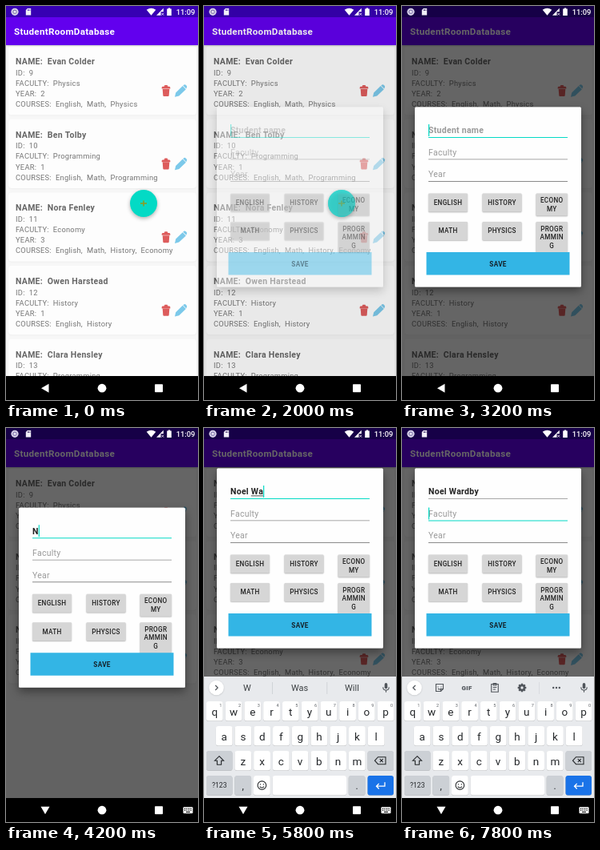
These frames come from a looping animation (240 px wide and 493 px high, 8000 ms). An HTML page with a canvas:

```html
<!DOCTYPE html>
<html lang="en">
<head>
<meta charset="utf-8">
<title>StudentRoomDatabase</title>
<style>
html, body { margin: 0; height: 100%; overflow: hidden; background: #000; }
canvas { display: block; width: 100vw; height: 100vh; }
</style>
</head>
<body>
<canvas id="stage"></canvas>
<script>
const W = 240, H = 493, LOOP = 8000, STEP = 200;
const NAV_TOP = 463, TEAL = '#03dac5';
const canvas = document.getElementById('stage');
const ctx = canvas.getContext('2d');
const ratio = window.devicePixelRatio || 1;
canvas.width = W * ratio;
canvas.height = H * ratio;

const students = [
  ['Evan Colder', 9, 'Physics', 2, 'English,  Math,  Physics'],
  ['Ben Tolby', 10, 'Programming', 1, 'English,  Math,  Programming'],
  ['Nora Fenley', 11, 'Economy', 3, 'English,  Math,  History,  Economy'],
  ['Owen Harstead', 12, 'History', 1, 'English,  History'],
  ['Clara Hensley', 13, 'Programming', 2, 'English,  Math']
];
const typedName = 'Noel Wardby';
const keyTimes = [4200, 4600, 4600, 4800, 5200, 5600, 5800, 6000, 6200, 6600, 6800];
const suggestions = [
  [0, ['N', 'No', 'Not']],
  [4800, ['Noe', 'Noel', 'Noels']],
  [5600, ['W', 'Was', 'Will']],
  [6000, ['War', 'Ward', 'Warm']]
];

const clamp = v => Math.max(0, Math.min(1, v));
const smooth = v => { v = clamp(v); return v * v * (3 - 2 * v); };

function rect(x, y, w, h, color, radius = 0) {
  ctx.fillStyle = color;
  ctx.beginPath();
  ctx.roundRect(x, y, w, h, radius);
  ctx.fill();
}

function circle(x, y, r, color) {
  rect(x - r, y - r, 2 * r, 2 * r, color, r);
}

// y is the middle of the capital letters
function text(s, x, y, size, color, { weight = 400, align = 'left', spacing = 0 } = {}) {
  ctx.font = `${weight} ${size}px Roboto, sans-serif`;
  ctx.letterSpacing = spacing + 'px';
  ctx.textAlign = align;
  ctx.fillStyle = color;
  ctx.fillText(s, x, y + size * 0.36);
  return ctx.measureText(s).width;
}

function icon(path, x, y, color, line = 0) {
  ctx.save();
  ctx.translate(x, y);
  const shape = new Path2D(path);
  if (line) {
    ctx.strokeStyle = color;
    ctx.lineWidth = line;
    ctx.stroke(shape);
  } else {
    ctx.fillStyle = color;
    ctx.fill(shape, 'evenodd');
  }
  ctx.restore();
}

function shadowed(blur, offset, alpha, draw) {
  ctx.save();
  ctx.shadowColor = `rgba(0,0,0,${alpha})`;
  ctx.shadowBlur = blur * ratio;
  ctx.shadowOffsetY = offset * ratio;
  draw();
  ctx.restore();
}

function drawCard([name, id, faculty, year, courses], top) {
  shadowed(2, 0.5, 0.06, () => rect(3, top, 235, 86.5, '#fdfdfd', 4));
  text('NAME:  ' + name, 12, top + 19.4, 10.5, '#666', { weight: 700, spacing: 0.28 });
  ['ID:  ' + id, 'FACULTY:  ' + faculty, 'YEAR:  ' + year, 'COURSES:  ' + courses]
    .forEach((s, i) => text(s, 12, top + 33.4 + i * 13.1, 9.33, '#757575', { spacing: 0.24 }));
  icon('M-4.3-2H4.3L3.7 6Q3.6 7 2.6 7H-2.6Q-3.6 7-3.7 6ZM-5.3-2.4V-4Q-5.2-5-4.2-5.2H-2.4L-1.6-7H1.6L2.4-5.2H4.2Q5.2-5 5.3-4V-2.4Z',
    200, top + 56, '#dd5c5c');
  icon('M-7.5 7.7L-6.3 2.4L2.3-6L6.4-1.8L-2.2 6.4ZM2.8-6.5L4.1-7.6Q5.2-8.2 6.2-7.2L7.4-5.9Q8.1-4.8 7.3-3.8L6.8-2.4Z',
    218.5, top + 56, '#7cc9ea');
}

function drawFab(ripple) {
  shadowed(5, 2, 0.3, () => circle(172, 247, 17, TEAL));
  if (ripple > 0) circle(172, 247, 17 * ripple, 'rgba(30,195,220,.3)');
  icon('M-4 0H4M0-3.5V3.5', 172, 247, '#8c9b22', 1.6);
}

function drawApp(t, resized) {
  rect(0, 0, W, NAV_TOP, '#f7f7f7');
  students.slice(0, resized ? 3 : 5).forEach((s, i) => drawCard(s, 50 + i * 91.6));
  drawFab(t < 2400 ? clamp((t - 1600) / 400) : 0);
  shadowed(2, 0.7, 0.2, () => rect(0, 14, W, 35, '#6200ee'));
  rect(0, 0, W, 14, '#3700b3');
  text('StudentRoomDatabase', 10, 32, 11.67, '#fff', { weight: 700, spacing: 0.28 });
}

function drawButton(lines, x, y, w, h) {
  shadowed(1.5, 0.7, 0.3, () => rect(x, y, w, h, '#d6d6d6', 1.2));
  const first = y + h / 2 - (lines.length - 1) * 5.2;
  lines.forEach((s, i) =>
    text(s, x + w / 2, first + i * 10.4, 8.17, '#212121', { weight: 500, align: 'center', spacing: 0.33 }));
}

function drawField(label, value, y, focused, cursorOn, bold, composing) {
  const style = { weight: bold ? 700 : 400, spacing: 0.28 };
  const width = text(value || label, 33, y, 10.5, value ? '#212121' : '#9a9a9a', style);
  rect(33, y + 8.4, 174, focused ? 1.2 : 0.8, focused ? TEAL : '#8a8a8a');
  if (!focused) return;
  const wordStart = value.lastIndexOf(' ') + 1;
  if (composing && wordStart < value.length) {
    const before = ctx.measureText(value.slice(0, wordStart)).width;
    rect(33 + before, y + 5, width - before, 0.8, '#212121');
  }
  if (cursorOn) rect(33 + (value ? width : 0), y - 7.5, 1.2, 15, TEAL);
}

function drawDialogPanel() {
  // Keep the shadow outside, so that the panel can fade evenly
  ctx.save();
  ctx.beginPath();
  ctx.rect(-W, -H, 3 * W, 3 * H);
  ctx.rect(16, 126.5, 208, 225);
  ctx.clip('evenodd');
  shadowed(12, 5, 0.4, () => rect(16, 126.5, 208, 225, '#fefefe', 1.5));
  ctx.restore();
  rect(16, 126.5, 208, 225, '#fefefe', 1.5);
}

function drawDialog(t) {
  const value = typedName.slice(0, keyTimes.filter(k => k <= t).length);
  const onFaculty = t >= 7000;
  const cursorOn = t < 2400 || t >= 3000;
  drawDialogPanel();
  drawField('Student name', value, 155.5, !onFaculty, cursorOn, true, t >= 4400);
  drawField('Faculty', '', 183, onFaculty, cursorOn);
  drawField('Year', '', 210.7, false);
  drawButton(['ENGLISH'], 33, 234.5, 49, 23);
  drawButton(['HISTORY'], 100.5, 234.5, 49, 23);
  drawButton(['ECONO', 'MY'], 167.5, 234.5, 39.5, 28);
  drawButton(['MATH'], 33, 270, 49, 23);
  drawButton(['PHYSICS'], 100.5, 270, 49, 23);
  drawButton(['PROGR', 'AMMIN', 'G'], 167.5, 270, 39.5, 38.5);
  rect(30.5, 308, 179, 28.5, '#33b5e5');
  text('SAVE', 120, 322.6, 8.17, '#15222a', { weight: 700, align: 'center', spacing: 0.3 });
}

function drawStrip(t) {
  const gray = '#50555b';
  const tools = t >= 7200;
  shadowed(2, 0.5, 0.2, () => circle(15.5, 325, 9.3, '#fff'));
  icon(tools ? 'M1.3-3L-1.7 0L1.3 3' : 'M-1.3-3L1.7 0L-1.3 3', 15.5, 325, gray, 1.2);
  icon('M-1.8-4Q-1.8-6 0-6T1.8-4V-.5Q1.8 1.3 0 1.3T-1.8-.5Z', 227.5, 325, gray);
  icon('M-3.7-.8Q-3.7 3 0 3T3.7-.8M0 3V5.8', 227.5, 325, gray, 1.1);
  if (!tools) {
    const words = suggestions.filter(([start]) => start <= t).pop()[1];
    words.forEach((s, i) => text(s, 54 + i * 65.5, 325.5, 11, '#3c4043', { align: 'center' }));
    [85, 153.5].forEach(x => rect(x, 318, 0.7, 15, '#c6cacf'));
    return;
  }
  icon('M-4.5-4.5H4.5V1.5L1.5 4.5H-4.5ZM4.5 1.5H1.5V4.5M-2-1.5V-.5M2-1.5V-.5M-2 1Q0 3 2 1', 47, 325, gray, 1.1);
  text('GIF', 81, 325, 8, gray, { weight: 900, align: 'center', spacing: 0.3 });
  icon('M-4.3-4.5H4.3V5.3H-4.3ZM-1.8-5.5H1.8V-3H-1.8ZM-2.3-.5H2.3M-2.3 2H1', 116, 325, gray, 1.1);
  for (let i = 0; i < 8; i++) {
    ctx.save();
    ctx.translate(150, 325);
    ctx.rotate(i * Math.PI / 4);
    rect(-1.2, -5.3, 2.4, 3, gray);
    ctx.restore();
  }
  circle(150, 325, 4.1, gray);
  circle(150, 325, 1.7, '#e8eaed');
  rect(171, 318, 0.7, 15, '#d3d6da');
  [-3.8, 0, 3.8].forEach(dx => circle(193 + dx, 325, 1.2, gray));
}

function drawKeyboard(t) {
  const dark = '#25282b', special = '#ccd0d5';
  const [row1, row2, row3, row4] = [354.2, 385.2, 416.2, 447.2];
  const key = (x, y, w, color = '#fff') =>
    shadowed(0.6, 0.6, 0.22, () => rect(x, y - 12.3, w, 24.6, color, 3));
  const row = (letters, firstX, y, digits) => [...letters].forEach((c, i) => {
    const x = firstX + i * 23.75;
    key(x - 10.4, y, 20.8);
    text(c, x, y + 0.5, 13.5, dark, { align: 'center' });
    if (digits) text(String((i + 1) % 10), x + 7.6, y - 7.5, 5.6, '#5f6368', { align: 'center' });
  });
  rect(0, 311, W, 153, '#e8eaed');
  drawStrip(t);
  row('qwertyuiop', 13.3, row1, true);
  row('asdfghjkl', 25.2, row2);
  row('zxcvbnm', 48.8, row3);

  key(3, row3, 32.5, special);
  icon('M0-5.5L5.5 0H2.6V5H-2.6V0H-5.5Z', 19, row3, dark, 1.1);
  key(204.5, row3, 32.5, special);
  icon('M-7 0L-3-4.5H6.5V4.5H-3ZM-.7-2L3.3 2M3.3-2L-.7 2', 220.5, row3, dark, 1.1);

  key(3, row4, 32.5, special);
  text('?123', 19.2, row4, 8.6, dark, { align: 'center' });
  key(38.3, row4, 20.8, special);
  text(',', 48.7, row4, 12, dark, { align: 'center' });
  key(62, row4, 20.8);
  icon('M-5.3 0A5.3 5.3 0 1 0 5.3 0A5.3 5.3 0 1 0-5.3 0M-2-2V-.7M2-2V-.7M-2.7 1.5Q0 4.5 2.7 1.5', 72.4, row4, dark, 1.1);
  key(85.7, row4, 92.3);
  key(180.7, row4, 20.8, special);
  text('.', 191, row4, 12, dark, { align: 'center' });
  key(204.5, row4, 32.5, '#1a73e8');
  icon('M5.5-4V1H-5M-1.8-2.3L-5 1L-1.8 4.3', 220.5, row4, '#fff', 1.3);
}

function drawSystemBars(typing) {
  circle(11, 7.3, 4.6, '#d9d4ea');
  circle(11, 7.3, 2.7, '#8b80b4');
  circle(11, 7.3, 1.5, '#e9e6f2');
  icon('M-1.2-4.3H3.2V4.3H-3.2V-2.2ZM-1.2-3H-.5V-1.2H-1.2ZM.3-3H1V-1.2H.3ZM1.7-3H2.3V-1.2H1.7Z', 28, 7.3, '#f1eff8');
  icon('M-5.8-2.6Q0-6.6 5.8-2.6L0 4.5Z', 181.5, 7.3, '#fff');
  icon('M4.3-4.5V0H1V4.5H-4.5Z', 192.5, 7.3, '#fff');
  icon('M1.8 1.5L4.6 4.3M4.6 1.5L1.8 4.3', 192.5, 7.3, '#fff', 0.8);
  icon('M-2.8-3.7H-1.2V-4.8H1.2V-3.7H2.8V4.7H-2.8Z', 204, 7.3, '#fff');
  text('11:09', 212.7, 7.8, 9.33, '#fff', { weight: 500 });

  rect(0, NAV_TOP, W, H - NAV_TOP, '#000');
  icon(typing ? 'M-5.5-4.5H5.5L0 5Z' : 'M4.5-5.5V5.5L-5 0Z', 49, 478.2, '#fff');
  circle(120, 478.2, 5.4, '#fff');
  rect(186, 473.3, 10, 10, '#fff', 0.8);
  if (typing) {
    rect(221.5, 474.3, 12, 8, '#fff', 1);
    for (let i = 0; i < 8; i++) rect(223 + i % 4 * 2.5, 475.8 + (i >> 2) * 2, 1.2, 1.1, '#000');
    rect(225, 480, 5, 1, '#000');
  }
}

function draw(t) {
  const typing = t >= 4200;
  const fade = clamp((t - 1900) / 220);
  const lift = 76 * smooth((t - 4080) / 300);
  const keyboardShown = smooth((t - 4200) / 200);

  ctx.setTransform(ratio, 0, 0, ratio, 0, 0);
  drawApp(t, typing);
  rect(0, 0, W, NAV_TOP, `rgba(0,0,0,${0.6 * fade ** 2.6})`);
  if (fade) {
    ctx.save();
    ctx.globalAlpha = fade;
    ctx.translate(0, -lift);
    drawDialog(t);
    ctx.restore();
  }
  if (fade > 0 && fade < 1) {
    ctx.save();
    ctx.globalAlpha = 0.45;
    drawFab(1);
    ctx.restore();
  }
  if (keyboardShown) {
    ctx.save();
    ctx.translate(0, 152 * (1 - keyboardShown));
    drawKeyboard(t);
    ctx.restore();
  }
  drawSystemBars(typing);
}

const start = performance.now();
function tick() {
  const t = (performance.now() - start) % LOOP;
  draw(Math.floor(t / STEP) * STEP);
  requestAnimationFrame(tick);
}
tick();
</script>
</body>
</html>
```
